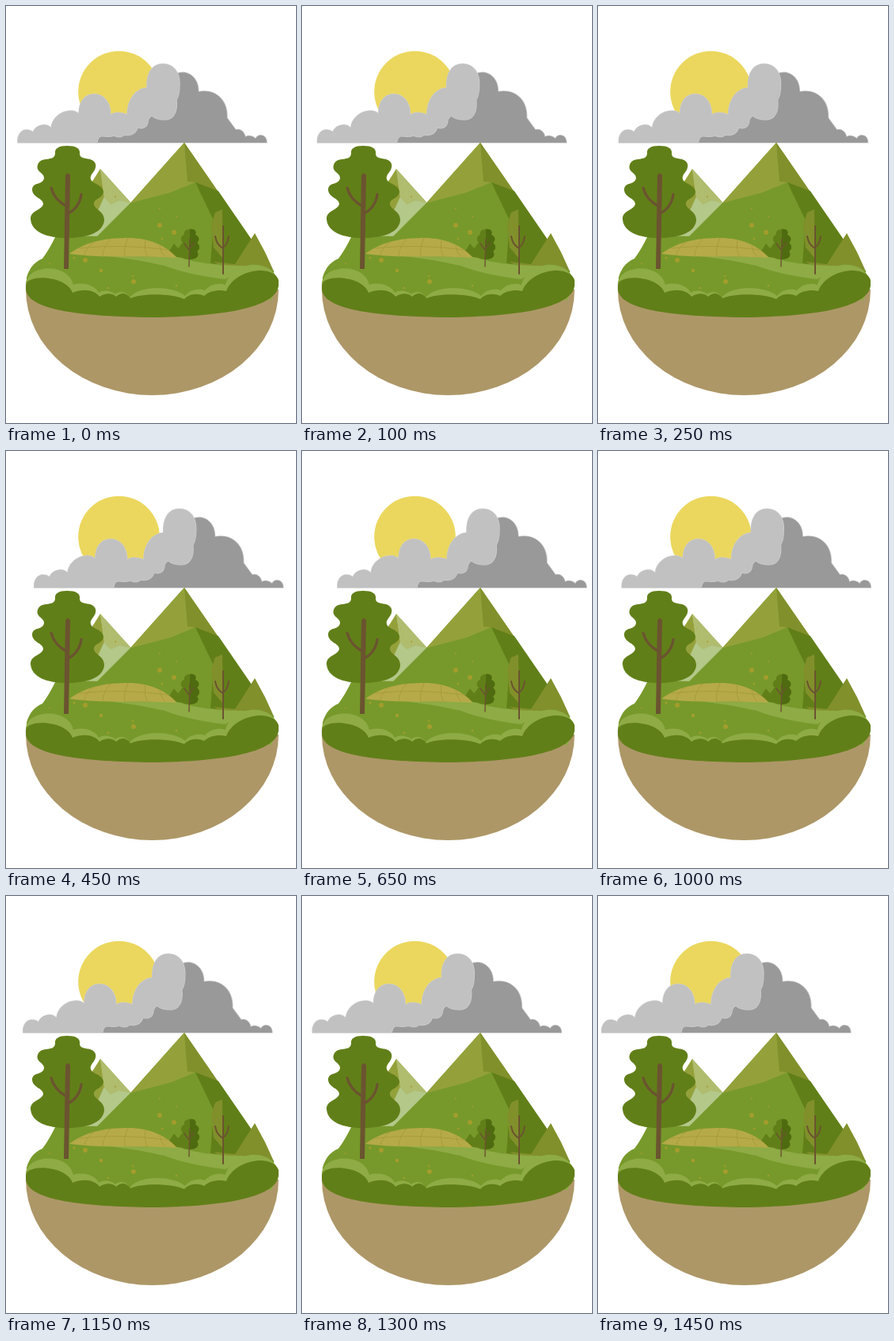
An HTML page with a canvas for the animation above (1.5 s loop, 366 px wide and 525 px high).

```html
<!DOCTYPE html>
<html lang="en">
<head>
<meta charset="utf-8">
<title>Island with a drifting cloud</title>
<style>
  html, body { margin: 0; width: 100%; height: 100%; overflow: hidden; background: #fff; }
  canvas { display: block; }
</style>
</head>
<body>
<canvas id="stage" width="366" height="525"></canvas>
<script>
const ctx = document.getElementById('stage').getContext('2d');
const color = {
  sun: '#ebd75e', lightCloud: '#c1c1c1', darkCloud: '#999', cloudEdge: '#cdcdcd',
  soil: '#ad9767', dark: '#617f18', shade: '#4f6b10', mid: '#77992b', light: '#8eab45',
  olive: '#94a13a', deepOlive: '#81902b', pale: '#b0bc6e', mist: '#b3c889',
  field: '#b6aa48', furrow: '#a49838', bark: '#6b5330', speck: '#a39d2c'
};

function fill(paint, d) {
  ctx.fillStyle = paint;
  ctx.fill(new Path2D(d));
}

function line(paint, width, d) {
  ctx.strokeStyle = paint;
  ctx.lineWidth = width;
  ctx.lineCap = 'round';
  ctx.stroke(new Path2D(d));
}

function circle(paint, x, y, r) {
  ctx.fillStyle = paint;
  ctx.beginPath();
  ctx.arc(x, y, r, 0, Math.PI * 2);
  ctx.fill();
}

function drawCloud(shift) {
  const back = 'M115 172L119 155L165 130L214 86C228 79 243 89 243 108C263 104 280 117 279 141' +
    'L290 156C296 154 301 159 302 165C306 162 312 164 315 167C319 160 329 162 329 172Z';
  const front = 'M15 172C14 163 19 156 26 156Q31 156 34 159C38 149 51 147 57 154' +
    'C58 141 70 132 82 132Q88 132 92 136C92 120 100 111 111 111C123 111 132 121 132 137' +
    'C138 133 147 134 153 137C153 119 163 104 178 103C177 84 185 73 198 73' +
    'C212 73 219 84 219 98C219 108 218 114 215 118C217 133 211 143 201 143' +
    'C192 143 187 141 184 138C180 140 179 143 179 146C178 153 172 155 166 153' +
    'C164 160 158 164 150 162C145 166 140 165 136 163C130 166 123 163 119 164Q115 167 115 172Z';
  ctx.save();
  ctx.translate(shift, 0);
  line(color.cloudEdge, 1.5, back);
  fill(color.darkCloud, back);
  line(color.cloudEdge, 1.5, front);
  fill(color.lightCloud, front);
  ctx.restore();
}

function drawMountains() {
  fill(color.mist, 'M119 205L158 248L113 293H80Z');
  fill(color.olive, 'M119 205L70 282L108 275L124 240Z');
  fill(color.pale, 'M119 205L158 248L143 245L132 250L124 241Z');

  fill(color.mid, 'M225 172L157 248L104 301L90 345H310L309 294Z');
  fill(color.olive, 'M225 172L157 248L207 235L239 222Z');
  fill(color.deepOlive, 'M225 172L229 221L239 222L268 234Z');
  fill(color.dark, 'M239 222L268 233L310 294L295 325H258L262 270Z');
  fill(color.deepOlive, 'M273 256L274 318L262 304L259 275L264 260Z');
  fill(color.deepOlive, 'M314 286L289 325L262 322L275 330L338 334L327 310Z');
}

function drawMeadow() {
  fill(color.mid, 'M26 342C30 328 37 322 46 318Q55 306 63 289L125 290L212 316L290 329L338 333V345L310 372H60L26 352Z');
  fill(color.light, 'M128 315L216 316Q255 328 302 327L277 344Q232 339 200 327Q160 318 128 315Z');
  fill(color.dark, 'M205 310L212 299L217 305L222 300L229 317L214 316Z');
  fill(color.field, 'M80 312C103 295 129 292 154 292C182 292 202 302 216 317C175 314 125 318 80 312Z');
  line(color.furrow, 0.8, 'M92 305Q145 299 205 307M111 297Q101 304 99 313M132 293Q122 304 122 315' +
    'M154 292Q148 304 150 315M176 295Q174 305 178 315M194 302Q195 309 200 315');
  for (const [x, y, r] of [[100, 320, 3], [120, 333, 2.3], [161, 347, 3], [194, 276, 3],
    [212, 285, 3], [86, 317, 1.5], [138, 240, 1], [129, 355, 1.3], [55, 324, 1], [215, 352, 1.2],
    [197, 293, 1.3], [160, 340, 1.2], [194, 255, 1], [215, 265, 1]]) {
    circle(color.speck, x, y, r);
  }
}

function drawSmallTrees() {
  const crown = 'M232 281C238 280 241 284 239 288C245 290 244 296 241 298C246 302 244 307 241 309' +
    'C245 314 241 319 231 319C222 319 218 314 223 309C218 306 219 301 223 298' +
    'C219 294 221 289 225 288C224 284 227 281 232 281Z';
  fill(color.dark, crown);
  ctx.save();
  ctx.clip(new Path2D(crown));
  ctx.fillStyle = color.shade;
  ctx.fillRect(232, 280, 14, 40);
  ctx.restore();
  line(color.bark, 1.4, 'M231 328L232 293M231 307L225 299M232 304L238 298');
  line(color.bark, 2, 'M274 337L274 277M274 305Q266 301 264 290M274 304Q280 300 281 290');
}

function drawBigTree() {
  fill(color.dark, 'M77 176C88 176 94 179 93 186C93 195 110 189 113 199C115 209 103 212 108 220' +
    'C112 225 122 225 123 234C122 243 110 242 111 250C113 257 124 258 124 270' +
    'C122 286 102 292 77 292C52 292 32 285 31 268C31 257 46 257 47 249' +
    'C47 242 33 241 33 231C34 221 46 226 48 217C49 210 37 209 40 200' +
    'C44 188 61 197 62 186C61 179 67 176 77 176Z');
  fill(color.bark, 'M73 331L75 213Q78 208 81 213L79 331Z');
  line(color.bark, 3.2, 'M76 252Q61 244 57 229M77 262Q93 254 95 237');
}

function drawBushes() {
  fill(color.light, 'M25 349C27 326 78 322 85 351C98 347 113 352 117 361C123 357 132 358 138 363' +
    'C145 357 153 361 156 367C168 352 208 351 226 365C232 357 243 355 251 358' +
    'C258 350 268 348 277 351C284 322 333 315 344 346L335 370H35Z');
  fill(color.dark, 'M25 352C25 337 76 339 84 361C99 355 112 358 118 366C125 361 134 361 139 366' +
    'C146 359 153 362 157 368C172 361 210 362 225 369C231 362 242 361 250 365' +
    'C258 358 269 357 278 359C288 332 336 324 344 345V352C341 381 268 391 185 392' +
    'C101 391 26 384 25 356Z');
}

function drawIsland() {
  fill(color.soil, 'M25 357A159.5 133 0 0 0 344 357Z');
  drawMountains();
  drawMeadow();
  drawSmallTrees();
  drawBigTree();
  drawBushes();
}

const LOOP = 1500, STEP = 50, TURN = 700, PEAK = 32.3;

// Drift right until TURN, then back left a little faster; the loop restarts with a jump.
function cloudShift(time) {
  const t = Math.floor(time % LOOP / STEP) * STEP;
  return t <= TURN ? PEAK * t / TURN : PEAK - (t - TURN) * 0.0566;
}

const start = performance.now();

function frame() {
  ctx.fillStyle = '#fff';
  ctx.fillRect(0, 0, 366, 525);
  circle(color.sun, 142.5, 108, 51.3);
  drawCloud(cloudShift(performance.now() - start));
  drawIsland();
  requestAnimationFrame(frame);
}
frame();
</script>
</body>
</html>
```
